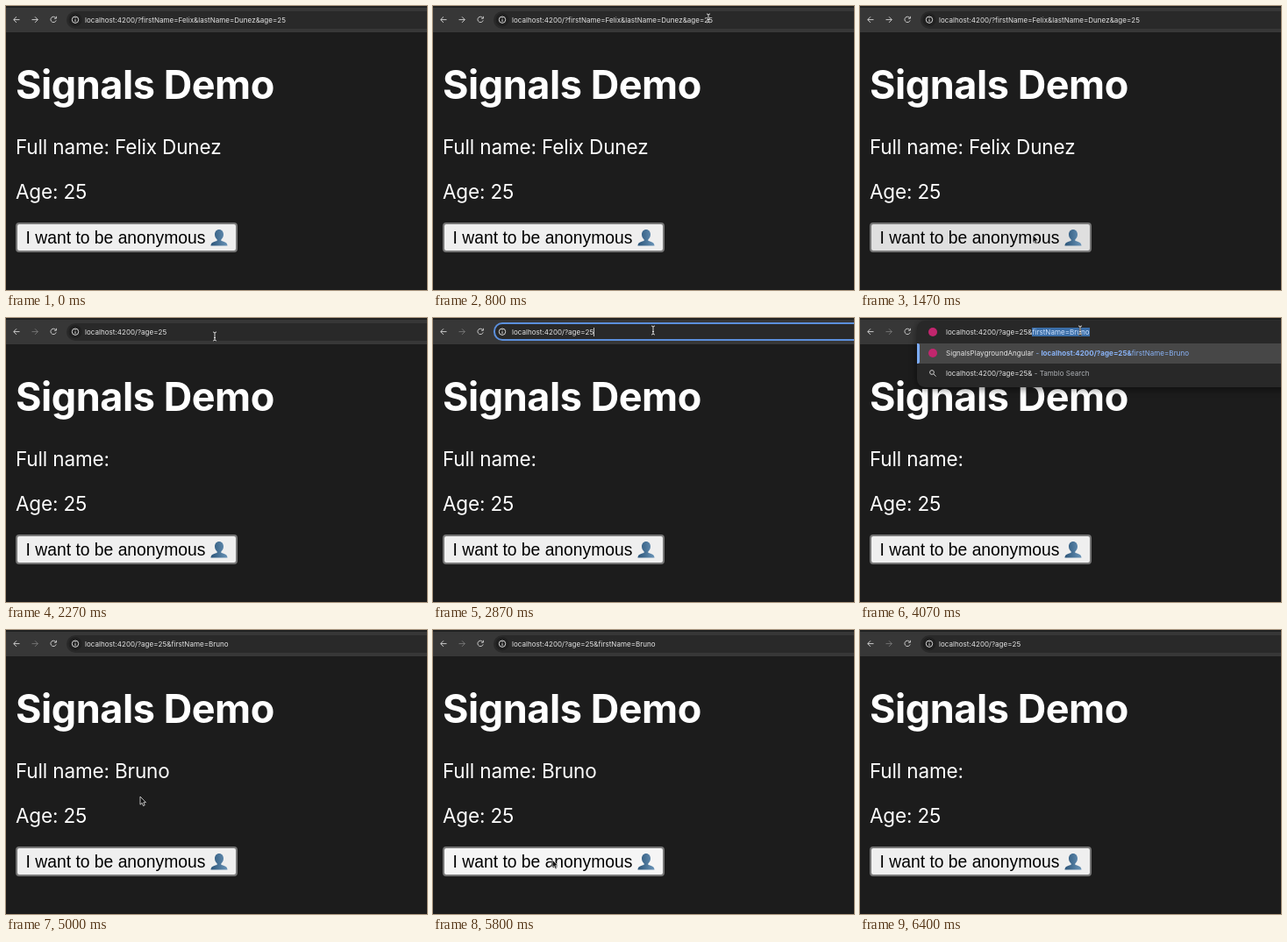
Animation, 480 px wide and 324 px high, one loop 7.27 s. Source, as an HTML page:

```html
<!DOCTYPE html>
<html lang="en">
<head>
<meta charset="utf-8">
<title>Signals Demo</title>
<style>
html, body { margin: 0; width: 100%; height: 100%; overflow: hidden; background: #1c1c1c; }
#stage {
  position: relative; width: 480px; height: 324px; overflow: hidden;
  background: #1c1c1c; color: #fff;
  font-family: Inter, "Open Sans", sans-serif; font-optical-sizing: none;
}
#stage div, #stage svg { position: absolute; }
#stage [hidden] { display: none; }

/* Zero line height: "top" is the vertical centre of the capitals. */
.line { line-height: 0; white-space: pre; }
.small { font-size: 8px; letter-spacing: .03px; color: #e6e6e6; }

#topEdge { width: 480px; height: 2px; background: #202121; }
#toolbar { top: 2px; width: 480px; height: 28px; background: #373737; }
#omnibox {
  left: 69px; top: 6px; width: 440px; height: 20px;
  border-radius: 10px; background: #292929; box-sizing: border-box;
}
#omnibox.focused { top: 5px; height: 21px; border: 2px solid #5b8fdc; }

#popup {
  left: 65px; top: 3px; width: 440px; height: 76px;
  border-radius: 9px; background: #282828; box-shadow: 0 2px 8px #0008;
}
#pick { top: 26px; width: 440px; height: 23px; background: #474747; }
#pick::before { content: ""; position: absolute; width: 3px; height: 23px; background: #7cacf8; border-radius: 0 2px 2px 0; }
.favicon { left: 13px; width: 10px; height: 10px; border-radius: 50%; background: #c2266e; }
.link { color: #8ab4f8; }
.muted { color: #aeb1b5; }

#url { top: 15.7px; }
#url .selected { background: #3b6ea8; color: #cfe3ff; }
#url .caret { border-left: 1px solid #c4c4c4; }

h1, p { margin: 0; position: absolute; left: 11px; }
h1 { top: 90px; font-size: 45px; font-weight: 700; letter-spacing: -.45px; }
p { font-size: 22.5px; letter-spacing: -.15px; }

#button {
  left: 11px; top: 247px; width: 253px; height: 34px; box-sizing: border-box;
  border: 2px solid #767676; border-radius: 4px; background: #efefef; color: #000;
}
#button.hover { background: #dfdfdf; }
#button.pressed { background: #f5f5f5; }
#button .line { left: 9.6px; top: 15.5px; font: 19.3px/0 "Liberation Sans", Arial, sans-serif; }
#button svg { left: 219px; top: 5px; }
#arrow, #beam { left: 0; top: 0; overflow: visible; }
</style>
</head>
<body>
<div id="stage">
  <h1 class="line">Signals Demo</h1>
  <p class="line" style="top:161px">Full name: <span id="name"></span></p>
  <p class="line" style="top:211.5px">Age: 25</p>

  <div id="button">
    <div class="line">I want to be anonymous</div>
    <svg width="22" height="22" viewBox="0 0 22 22">
      <defs>
        <linearGradient id="steel">
          <stop stop-color="#2b5579"/><stop offset="1" stop-color="#6a94b8"/>
        </linearGradient>
      </defs>
      <path fill="url(#steel)" d="M11 1C14 1 16 3.4 16 6.7C16 9 14.8 11.2 13.4 12.3V14C17 15 20.5 15.6 20.5 19.5H1.5C1.5 15.6 5 15 8.6 14V12.3C7.2 11.2 6 9 6 6.7C6 3.4 8 1 11 1Z"/>
    </svg>
  </div>

  <div id="topEdge"></div>
  <div id="toolbar"></div>
  <svg width="66" height="30" fill="none" stroke="#c9c9c9">
    <path d="M15.5 15.6H8.8M12 12.3L8.7 15.6L12 18.9"/>
    <path id="forward" d="M29.5 15.6H36.2M33 12.3L36.3 15.6L33 18.9"/>
    <path id="reload" d="M56.8 13.6A3.2 3.2 0 1 0 57.2 16.4M57.4 11.8V14.2H55"/>
    <path id="stop" d="M51 12.6L57 18.6M57 12.6L51 18.6"/>
  </svg>
  <div id="omnibox"></div>
  <svg id="info" width="90" height="30" fill="none" stroke="#d8d8d8">
    <circle id="chip" cx="79" cy="15.7" r="7.5" fill="#202020" stroke="none"/>
    <circle cx="79" cy="15.7" r="3.7"/>
    <path d="M79 15.2V17.9M79 13.2V14.2"/>
  </svg>

  <div id="popup">
    <div class="favicon" style="top:8px"></div>
    <div id="pick"></div>
    <div class="favicon" style="top:32px"></div>
    <div class="line small" style="left:33px;top:37.3px">SignalsPlaygroundAngular<span class="link"> - <b>localhost:4200/?age=25&amp;</b>firstName=Bruno</span></div>
    <svg style="left:13px;top:55px" width="10" height="10" fill="none" stroke="#c9c9c9">
      <circle cx="4" cy="4" r="2.4"/><path d="M5.8 5.8L8.6 8.6"/>
    </svg>
    <div class="line small" style="left:33px;top:60.3px">localhost:4200/?age=25&amp; <span class="muted">- Tamblo Search</span></div>
  </div>
  <div id="url" class="line small"></div>

  <svg id="arrow" width="10" height="14">
    <path d="M0 0V9.2L2.1 7.3L3.5 10.6L5.2 9.9L3.8 6.7H6.5Z" fill="#111" stroke="#e8e8e8" stroke-width=".8"/>
  </svg>
  <svg id="beam" width="10" height="14" fill="none">
    <defs><path id="beamShape" d="M-2 -5Q0 -5 0 -3.8Q0 -5 2 -5M0 -4V4M-2 5Q0 5 0 3.8Q0 5 2 5M-1 1.5H1"/></defs>
    <use href="#beamShape" stroke="#161616" stroke-width="2.2"/>
    <use href="#beamShape" stroke="#e4e4e4"/>
  </svg>
</div>

<script>
const LOOP = 7270, FRAME = 1000 / 15;
const HOST = "localhost:4200/?";
const $ = id => document.getElementById(id);

// Pointer stops: time in ms, x, y.
const path = [
  [60, 416, 141], [400, 200, 60], [533, 100, 14], [800, 314, 14], [1330, 197, 261],
  [1933, 197, 261], [2267, 238, 21], [2730, 251, 14], [4467, 251, 14],
  [5000, 153, 190], [5200, 130, 233], [5530, 136, 262], [6200, 136, 262], [6340, 278, 268]
];

const smooth = k => k * k * (3 - 2 * k);
const toggle = (el, shown) => el.toggleAttribute("hidden", !shown);

function pointerAt(t) {
  const next = path.findIndex(stop => stop[0] > t);
  if (next < 0) return path[path.length - 1].slice(1);
  if (next === 0) return path[0].slice(1);
  const [t0, x0, y0] = path[next - 1], [t1, x1, y1] = path[next];
  const k = smooth((t - t0) / (t1 - t0));
  return [x0 + (x1 - x0) * k, y0 + (y1 - y0) * k];
}

function setHTML(el, html) {
  if (el.dataset.html !== html) el.innerHTML = el.dataset.html = html;
}

function draw(ms) {
  const t = Math.floor((ms + 4) / FRAME) * FRAME + 1;
  const during = (from, to) => t >= from && t < to;

  const focused = during(2595, 4130), popup = during(3530, 4130);
  const named = t < 1595, bruno = during(4195, 5930);
  setHTML($("name"), named ? "Felix Dunez" : bruno ? "Bruno" : "");

  let url = HOST + "age=25";
  if (named) url = HOST + "firstName=Felix&amp;lastName=Dunez&amp;age=25";
  else if (during(2595, 2795)) url = `<span class="selected">${url}</span>`;
  else if (popup) url += '&amp;<span class="selected">firstName=Bruno</span>';
  else if (during(4130, 5930)) url += "&amp;firstName=Bruno";
  else if (during(3465, 3530)) url += '&amp;<span class="caret"></span>';
  else if (during(2795, 3330)) url += '<span class="caret"></span>';
  setHTML($("url"), url);
  $("url").style.left = popup ? "98px" : "90px";

  $("omnibox").className = focused ? "focused" : "";
  toggle($("popup"), popup);
  toggle($("info"), !popup);
  toggle($("chip"), !focused);
  const loading = during(4130, 4195);
  toggle($("reload"), !loading);
  toggle($("stop"), loading);
  $("forward").style.opacity = named ? 1 : .4;

  const [x, y] = pointerAt(t);
  const visible = during(65, 6395), inBar = y < 30;
  toggle($("arrow"), visible && !inBar);
  toggle($("beam"), visible && inBar);
  $("arrow").style.transform = $("beam").style.transform = `translate(${x}px, ${y}px)`;

  const hover = visible && y > 248 && y < 282 && x < 264;
  const pressed = during(1530, 1595) || during(5795, 5865);
  $("button").className = pressed ? "pressed" : hover ? "hover" : "";
}

const start = performance.now();
function tick() {
  draw((performance.now() - start) % LOOP);
  requestAnimationFrame(tick);
}
tick();
</script>
</body>
</html>
```
